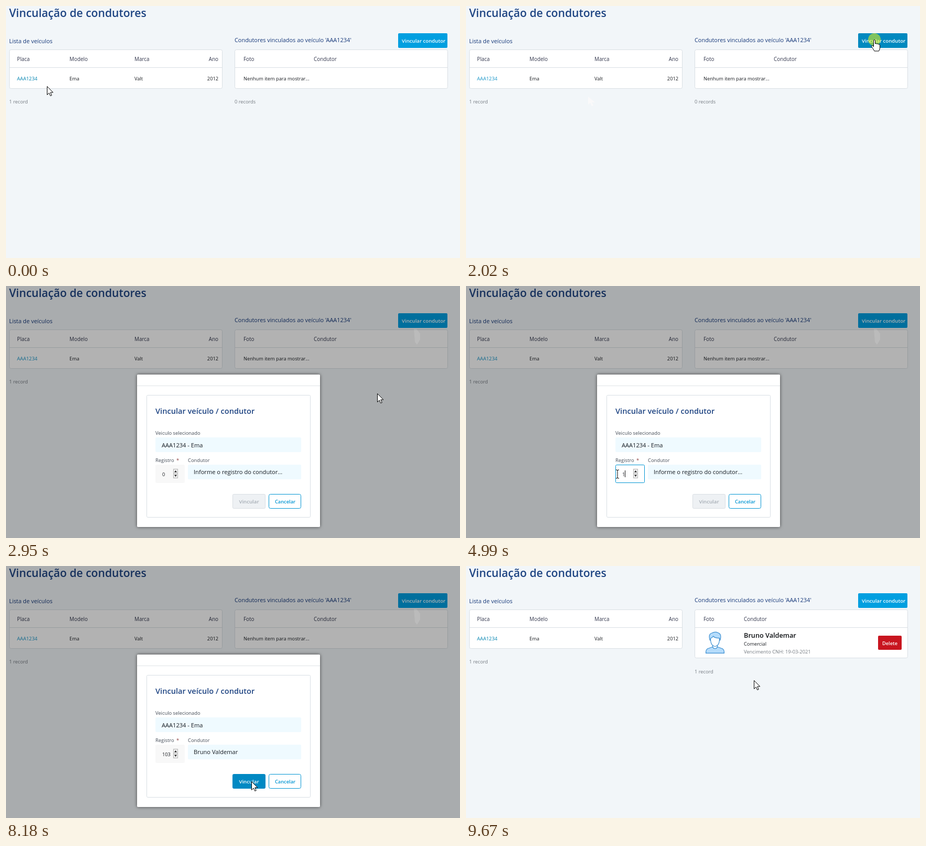
These frames come from a looping animation (866 by 481 pixels, 9730 ms). An HTML page:

```html
<!DOCTYPE html>
<html lang="pt-BR">
<head>
<meta charset="utf-8">
<title>Vinculação de condutores</title>
<style>
html, body { margin: 0; width: 100%; height: 100%; overflow: hidden; background: #f2f6f9; }
svg { display: block; width: 100vw; height: 100vh; }
text { font: 9.25px "Open Sans", "Noto Sans", sans-serif; fill: #1a1d22; white-space: pre; }
.title { font-size: 21.1px; font-weight: 600; fill: #1f4583; }
.sub { font-size: 10.9px; font-weight: 500; fill: #17397a; }
.head { font-size: 9.9px; fill: #34384e; }
.note { fill: #757b82; }
.btn { font-size: 9.65px; font-weight: 600; fill: #fff; }
.dialog { font-size: 14.6px; font-weight: 600; fill: #1f4583; }
.label { font-size: 9.36px; fill: #434b56; }
.value { font-size: 11.1px; fill: #171c22; }
.name { font-size: 12.7px; font-weight: 600; fill: #0c0f12; }
.card { fill: #fff; stroke: #d9dfe4; }
.field { fill: #effaff; }
</style>
</head>
<body>
<svg id="stage" viewBox="0 0 866 481" preserveAspectRatio="none">
  <defs>
    <filter id="shadow" x="-10%" y="-20%" width="120%" height="140%">
      <feDropShadow dx="0" dy="0" stdDeviation="3" flood-opacity=".6"/>
    </filter>
  </defs>
  <rect width="866" height="481" fill="#f2f6f9"/>
  <text class="title" x="6" y="21">Vinculação de condutores</text>
  <text class="sub" x="6" y="71">Lista de veículos</text>
  <rect class="card" x="6.5" y="83.5" width="406" height="74" rx="3"/>
  <path d="M7 117.5H412" stroke="#d9dfe4"/>
  <text class="head" x="21" y="105">Placa</text>
  <text class="head" x="121" y="105">Modelo</text>
  <text class="head" x="245" y="105">Marca</text>
  <text class="head" x="405" y="105" text-anchor="end">Ano</text>
  <text id="plate" x="21" y="142">AAA1234</text>
  <text x="121" y="142">Ema</text>
  <text x="245" y="142">Valt</text>
  <text x="405" y="142" text-anchor="end">2012</text>
  <text class="note" x="6" y="186">1 record</text>

  <text class="sub" x="436" y="69">Condutores vinculados ao veículo 'AAA1234'</text>
  <rect id="list" class="card" x="436.5" y="83.5" width="406" height="74" rx="3"/>
  <path d="M437 117.5H842" stroke="#d9dfe4"/>
  <text class="head" x="453" y="105">Foto</text>
  <text id="column" class="head" x="587" y="105">Condutor</text>
  <text id="empty" x="453" y="142">Nenhum item para mostrar...</text>
  <g id="driver">
    <g id="avatar" stroke="#3d8fd1" stroke-width="1.2" stroke-linejoin="round">
      <path d="M457.6 166.4V164Q457.600 158.500 463 157L470 154.500H480L487 157Q492.400 158.500 492.400 164V166.400Z" fill="#b5dcfb"/>
      <path d="M470.500 149V155Q475 160.500 479.500 155V149Z" fill="#fff"/>
      <path d="M466.500 137Q466 152.500 475 153.500Q484 152.500 483.500 137L479 132H470Z" fill="#fff"/>
      <path d="M465.500 142Q461.500 130 469 128Q475 124.500 481 127.500Q488.500 130 484.500 142L483.500 137.500Q475 138 471.500 134Q470 137 467 137.500Z" fill="#b5dcfb"/>
    </g>
    <text class="name" x="530" y="137">Bruno Valdemar</text>
    <text x="530" y="152">Comercial</text>
    <text class="note" style="font-size:9.36px" x="530" y="167">Vencimento CNH: 19-03-2021</text>
    <rect x="786" y="133" width="45" height="27" rx="2" fill="#c8151f"/>
    <text class="btn" style="font-size:9.25px" x="808.500" y="151" text-anchor="middle">Delete</text>
  </g>
  <text id="count" class="note" x="436" y="186">0 records</text>
  <path id="trailA" d="M233 173V188L237 185L240 191L243 190L240 184L246 184Z" fill="#faf9fa"/>
  <rect id="link" x="748" y="52" width="94" height="28" rx="2"/>
  <text class="btn" x="755" y="70">Vincular condutor</text>

  <rect id="shade" width="866" height="481" opacity=".3"/>
  <path id="trailB" d="M778 82H783L790 91V102L784 112L780 107Z" fill="#fff" opacity=".12"/>

  <g id="loading">
    <rect x="250" y="284" width="349" height="62" rx="2" fill="#fff" filter="url(#shadow)"/>
    <text x="352" y="334">Please wait while content is loading...</text>
  </g>
  <g id="modal">
    <rect x="250" y="169" width="349" height="291" rx="2" fill="#fff" filter="url(#shadow)"/>
    <path d="M250 190.500H599" stroke="#dfe3e7"/>
    <rect class="card" x="268.500" y="208.500" width="312" height="233" rx="2"/>
    <text class="dialog" x="285" y="244">Vincular veículo / condutor</text>
    <text class="label" x="285" y="284">Veiculo selecionado</text>
    <rect class="field" x="285" y="289" width="278" height="28" rx="2"/>
    <text class="value" x="297" y="308">AAA1234 - Ema</text>
    <text class="label" x="285" y="336">Registro</text>
    <text class="label" x="325" y="336" style="fill:#8c3a3a">*</text>
    <text class="label" x="347" y="336">Condutor</text>
    <rect id="number" x="285.500" y="341.500" width="55" height="34" rx="2"/>
    <rect id="selection" x="298" y="352" width="6" height="13" fill="#0078d7"/>
    <text id="digits" x="298" y="363"></text>
    <path id="caret" stroke="#111"/>
    <rect x="319.500" y="349.500" width="8" height="17" fill="#f0f0f0" stroke="#b4b4b4"/>
    <path d="M319 358H328" stroke="#b4b4b4"/>
    <path d="M321 355.500L323.500 352L326 355.500ZM321 360.500L323.500 364L326 360.500Z" fill="#222"/>
    <rect class="field" x="347" y="341" width="216" height="28" rx="2"/>
    <text id="person" class="value" x="358" y="359"></text>
    <rect id="save" x="432.500" y="397.500" width="62" height="27" rx="2"/>
    <text id="saveText" class="btn" x="463.500" y="415" text-anchor="middle">Vincular</text>
    <rect x="501.500" y="397.500" width="61" height="27" rx="3" fill="#fff" stroke="#0095d3"/>
    <text class="btn" x="532.500" y="415" text-anchor="middle" style="font-size:9.3px;fill:#0095d3">Cancelar</text>
  </g>

  <circle id="click" r="12" fill="#ff0" opacity=".5"/>
  <g id="cursor" stroke-linejoin="round">
    <path id="arrow" d="M.5 .5V16.500L4.200 13L6.700 18.500L9.200 17.500L6.800 12H11.800Z" fill="#fff" stroke="#000"/>
    <path id="hand" d="M-1.500 1.500Q0-.5 1.500 1.500V8Q3 6.500 4.500 8.500Q6 7 7.500 9Q10 8 10.500 11V16Q10 19 8.500 22H0Q-2 18-5.500 13.500Q-5.500 10.500-3 12L-1.500 13.500Z" fill="#fff" stroke="#000"/>
    <path id="beam" d="M-3-8H-1L0-7L1-8H3M0-7V7M-3 8H-1L0 7L1 8H3" fill="none" stroke="#000"/>
  </g>
</svg>
<script>
const LOOP = 9730;
const el = {};
document.querySelectorAll("#stage [id]").forEach(n => el[n.id] = n);

// [first step, last step, number of steps, x, y]
const moves = [
  [60, 390, 5, 94, 129],
  [530, 820, 5, 233, 173],
  [890, 1480, 8, 754, 83],
  [1560, 1720, 3, 779, 64],
  [2480, 2950, 6, 708, 205],
  [3020, 3590, 8, 303, 339],
  [3740, 3830, 2, 306, 358],
  [3980, 4150, 3, 289, 359],
  [6170, 7140, 13, 460, 404],
  [7210, 7450, 3, 468, 411],
  [9260, 9670, 6, 549, 218]
];

function pointer(t) {
  let x = 78, y = 153;
  for (const [from, to, n, tx, ty] of moves) {
    if (t < from) break;
    const step = Math.floor((t - from) / (to - from) * (n - 1)) + 1;
    const p = Math.min(1, step / n);
    x += (tx - x) * p;
    y += (ty - y) * p;
  }
  return [Math.round(x), Math.round(y)];
}

const show = (node, on) => node.setAttribute("display", on ? "inline" : "none");
const set = (node, attrs) => { for (const k in attrs) node.setAttribute(k, attrs[k]); };
const write = (node, s) => { if (node.textContent !== s) node.textContent = s; };

function render(t) {
  const within = (a, b) => t >= a && t < b;
  const [x, y] = pointer(t);
  const over = (l, top, r, b) => x >= l && x <= r && y >= top && y <= b;
  const dim = within(2100, 8240);
  const modal = within(2480, 8240);
  const filled = t >= 6300;
  const listed = t >= 8410;

  el.plate.style.fill = within(390, 8240) ? "#1795c8" : "#0083b0";
  set(el.list, { height: listed ? 92 : 74 });
  set(el.column, { x: listed ? 530 : 587 });
  set(el.count, { y: listed ? 205 : 186 });
  write(el.count, listed ? "1 record" : "0 records");
  show(el.empty, !listed);
  show(el.driver, listed);
  show(el.avatar, t >= 8560);
  show(el.trailA, within(890, 2100));
  show(el.trailB, modal);
  show(el.shade, dim);

  const hover = over(748, 52, 842, 80);
  set(el.link, { fill: hover ? "#0089bf" : "#009fe0" });
  show(el.loading, within(2100, 2480));
  show(el.modal, modal);

  const focus = within(4210, 7920);
  const selected = within(4210, 4990);
  const digits = t < 4990 ? "0" : t < 5250 ? "1" : t < 5320 ? "10" : "103";
  set(el.number, { fill: focus ? "#fff" : "#f8f8f8", stroke: focus ? "#0095d3" : "#f8f8f8" });
  show(el.selection, selected);
  write(el.digits, digits);
  el.digits.style.fill = selected ? "#fff" : "#1a1d22";
  const blink = t < 5640 || Math.floor((t - 5640) / 530) % 2 === 1;
  show(el.caret, focus && t >= 4990 && blink);
  set(el.caret, { d: `M${298.5 + 5 * digits.length} 352V365` });
  write(el.person, filled ? "Bruno Valdemar" : "Informe o registro do condutor...");

  const onSave = modal && filled && over(432, 397, 495, 425);
  const saveFill = !filled ? "#eef1f4" : onSave ? "#0089c3" : "#009fe0";
  set(el.save, { fill: saveFill, stroke: filled ? saveFill : "#d9dee3" });
  el.saveText.style.fill = filled ? "#fff" : "#a5acb4";

  const onField = modal && (over(285, 341, 341, 376) || over(347, 341, 563, 369) || over(285, 289, 563, 317));
  const hand = (hover && !dim) || (onSave && t < 8180);
  show(el.beam, onField);
  show(el.hand, hand);
  show(el.arrow, !onField && !hand);
  set(el.cursor, { transform: `translate(${x} ${y})` });
  show(el.click, within(1960, 2100) || within(4210, 4380) || within(7920, 8090));
  set(el.click, { cx: x, cy: y });
}

function tick() {
  render(performance.now() % LOOP);
  requestAnimationFrame(tick);
}
tick();
</script>
</body>
</html>
```
